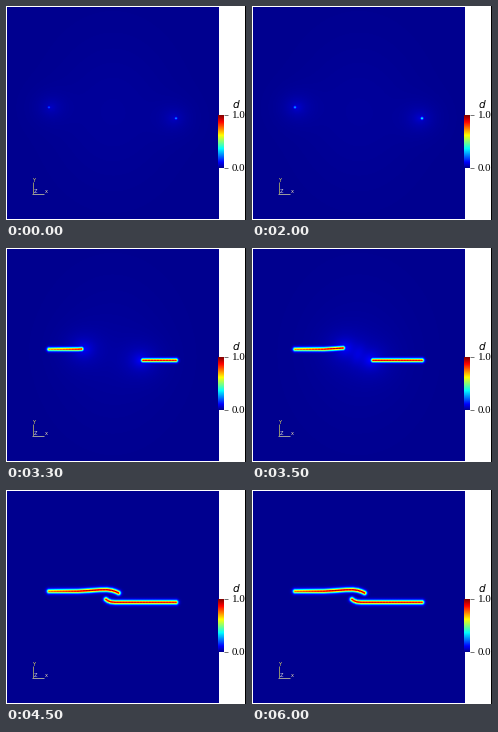
A matplotlib script that plays this animation: 240x214 px, repeating every 6.2 s.

```python
import numpy as np
import matplotlib.pyplot as plt
from matplotlib.animation import FuncAnimation
from matplotlib.colors import LinearSegmentedColormap
from matplotlib.patches import Rectangle

W, H, DPI = 240, 214, 100
FRAMES, STEP = 62, 100
PX = 72 / DPI
HELD = {2: 1, 3: 1, 4: 1, 7: 6, 11: 10, 17: 16, 21: 20, 51: 50, 61: 60}

JET = LinearSegmentedColormap.from_list("damage", [
    (0.0, (0, 0, 0.5625)), (0.111, (0, 0, 1)), (0.365, (0, 1, 1)),
    (0.492, (0.5, 1, 0.5)), (0.619, (1, 1, 0)), (0.873, (1, 0, 0)),
    (1.0, (0.5, 0, 0))], N=512)

X, Y = np.meshgrid(np.arange(1, 213) + 0.5, np.arange(1, 213) + 0.5)
BAND = slice(84, 128)

# crack centre lines (x, y) and tip positions over time
LEFT = ([43, 72, 84, 94, 101, 106, 110, 113],
        [101.3, 101.2, 100.5, 99.8, 99.7, 100.4, 101.7, 103.2])
RIGHT = ([99.5, 102, 105, 109, 170],
         [109, 110.8, 111.9, 112.3, 112.3])
TIMES = [2000, 2200, 2500, 2900, 3100, 3300, 3500, 3600, 3700, 4000, 4400]
TIP_L = [43, 43.6, 47, 55, 64, 75.5, 91, 100, 108.5, 111, 112.5]
TIP_R = [170, 169.4, 166, 157.5, 148, 137, 121, 112, 103, 101, 100]


def crack(path, start, tip, amp, width):
    """Damage band along a path; amp holds the levels at x = 43, 80, 170."""
    xs = np.linspace(start, tip, int(abs(tip - start) / 0.6) + 1)
    ys = np.interp(xs, *path)
    peak = np.interp(xs, [43, 80, 170], amp)[:, None, None]
    r2 = (X[BAND] - xs[:, None, None]) ** 2 + (Y[BAND] - ys[:, None, None]) ** 2
    return (peak * np.exp(-(r2 / width ** 2) ** 0.75)).max(axis=0)


def glow(x, y, rx, ry, level):
    return level * np.exp(-np.hypot((X - x) / rx, (Y - y) / ry))


def field(t):
    left = np.interp(t, TIMES, TIP_L)
    right = np.interp(t, TIMES, TIP_R)
    width = np.interp(t, [0, 2000, 2900, 3300, 4400], [1.3, 1.45, 1.8, 1.8, 2.0])
    grow = np.interp(t, [0, 2000, 2500, 2900], [0.34, 0.46, 0.62, 1])
    full = np.interp(t, [2900, 3700], [0.68, 0.8])
    fade = np.interp(t, [3600, 4300], [1, 0])

    halo = np.interp(t, [0, 2000, 2900, 3700], [0.05, 0.065, 0.1, 0.12]) * fade
    d = glow(left + 2, np.interp(left, *LEFT), 9, 8, halo)
    d += glow(right - 2, np.interp(right, *RIGHT), 9, 8, halo)
    d += 0.012 * fade * np.exp(-((X - 107) / 60) ** 2 - ((Y - 106) / 75) ** 2)
    d += 0.07 * np.interp(t, [3400, 3700, 4200], [0, 1, 0]) * np.exp(
        -((X - 106 + 0.3 * (Y - 106)) / 5) ** 2 - ((Y - 106) / 9) ** 2)

    a = crack(LEFT, 43, left, np.array([full, 0.96, 0.96]) * grow, width)
    b = crack(RIGHT, 170, right, np.array([0.95, 0.95, 0.9]) * grow, width)
    d[BAND] = np.maximum(d[BAND], np.maximum(a, b))
    return d


fig = plt.figure(figsize=(W / DPI, H / DPI), dpi=DPI, facecolor="white")
ax = fig.add_axes([0, 0, 1, 1])
ax.axis("off")


def line(xs, ys, color):
    ax.plot(xs, ys, color=color, lw=PX, solid_capstyle="butt")


def label(x, y, s, size, color="black", **kw):
    ax.text(x, y, s, fontsize=size * PX, color=color, va="baseline", **kw)


image = ax.imshow(field(0), cmap=JET, vmin=0, vmax=1, extent=(1, 213, 213, 1),
                  interpolation="nearest")

# colour bar
ax.imshow(np.linspace(1, 0, 256)[:, None], cmap=JET, vmin=0, vmax=1,
          extent=(212, 218, 162, 109), aspect="auto", zorder=3)
for y, s in ((109, "1.0"), (162, "0.0")):
    line([218, 222], [y - 0.5, y - 0.5], "#777777")
    label(226, y + 3, s, 11, family="Liberation Serif")
label(226.5, 102, "d", 10.5, family="DejaVu Sans", style="italic")
ax.add_patch(Rectangle((239, 0), 1, H, color="black", lw=0))

# orientation axes
line([26.5, 26.5], [176, 188], "#8c8c70")
line([26, 38], [187.5, 187.5], "#9a9a9a")
for x, y, s, color in ((26, 176, "Y", "#e8e060"), (27.5, 187, "Z", "#d8d8d8"),
                       (39, 187, "x", "#e6d8b0")):
    label(x, y, s, 5, color, family="DejaVu Sans")

ax.set_xlim(0, W)
ax.set_ylim(H, 0)
ax.set_aspect("auto")


def update(n):
    image.set_data(field(HELD.get(n, n) * STEP))
    return [image]


anim = FuncAnimation(fig, update, frames=FRAMES, interval=STEP,
                     repeat=True, repeat_delay=0)
plt.show()
```
